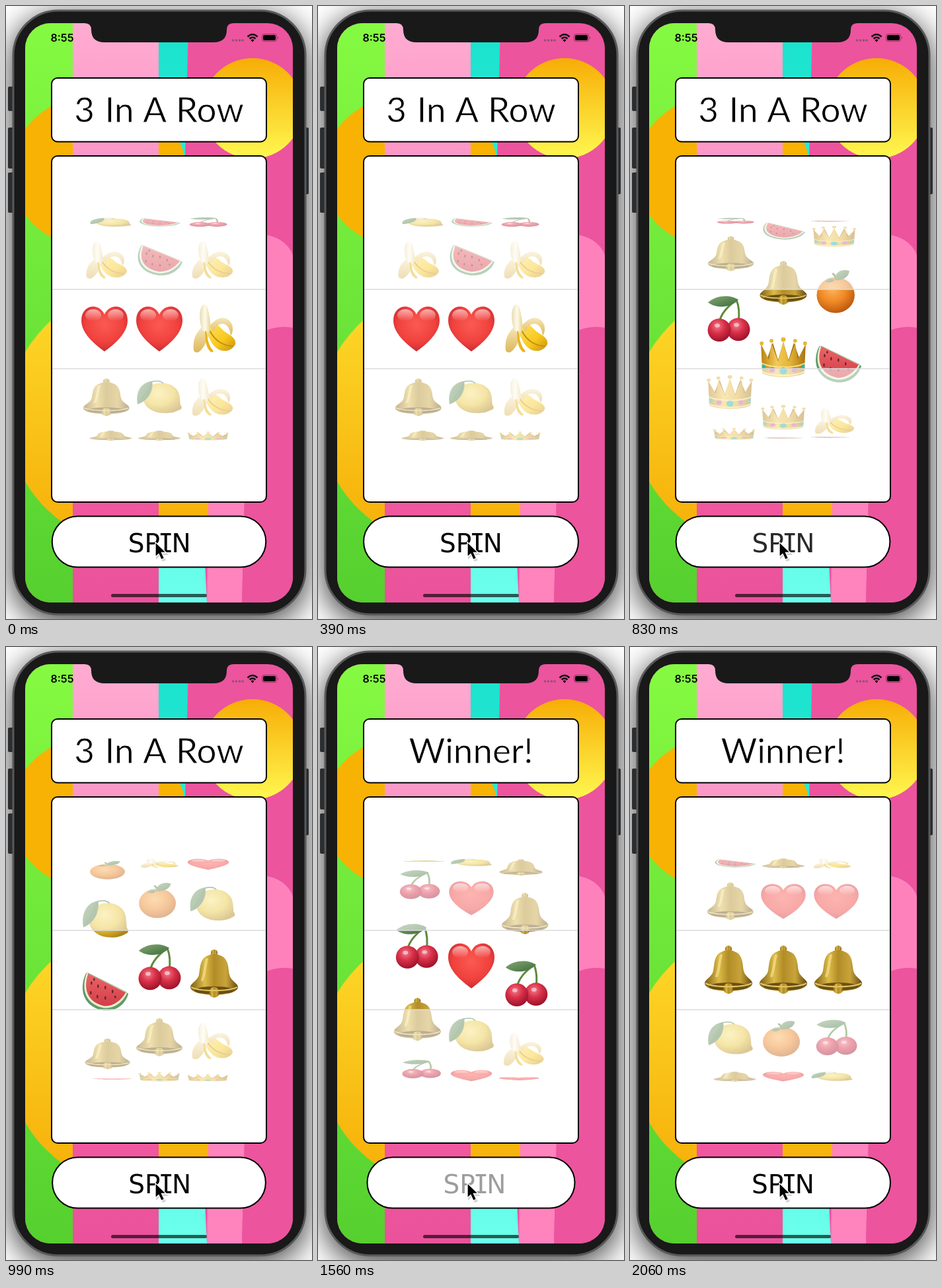
An HTML page that plays this animation: 463 px wide and 928 px high, repeating every 2090 ms.

```html
<!DOCTYPE html>
<html lang="en">
<head>
<meta charset="utf-8">
<title>3 In A Row</title>
<style>
  html, body { margin: 0; width: 100%; height: 100%; overflow: hidden; background: #fff; }
  #stage { position: relative; width: 463px; height: 928px; overflow: hidden; }
  #shadow { position: absolute; left: 11px; top: 7px; width: 442px; height: 914px; border-radius: 68px;
    box-shadow: 0 10px 44px 4px rgba(0, 0, 0, .72); }
  svg { position: absolute; left: 0; top: 0; display: block; }
  .panel { fill: #fff; stroke: #000; stroke-width: 2; }
  .title { font: 400 53px Lato, "Open Sans", sans-serif; text-anchor: middle; word-spacing: 2px; stroke: #fff; stroke-width: .8; }
  .clock { font: 600 16px Inter, Roboto, sans-serif; }
  .spin { font: 39px "DejaVu Sans", sans-serif; }
  .serif-i { font-family: "DejaVu Sans Mono", monospace; }
</style>
</head>
<body>
<div id="stage">
<div id="shadow"></div>
<svg width="463" height="928" viewBox="0 0 463 928">
  <defs>
    <linearGradient id="green" x2="0" y2="1"><stop stop-color="#85fa42"/><stop offset="1" stop-color="#55d02f"/></linearGradient>
    <linearGradient id="pink" x2="0" y2="1"><stop stop-color="#ffabd1"/><stop offset=".22" stop-color="#fb98c7"/><stop offset=".82" stop-color="#f0589f"/><stop offset="1" stop-color="#ea529b"/></linearGradient>
    <linearGradient id="teal" x2="0" y2="1"><stop stop-color="#18e2cd"/><stop offset="1" stop-color="#6cffec"/></linearGradient>
    <linearGradient id="sun" x2="0" y2="1"><stop stop-color="#f7ad06"/><stop offset="1" stop-color="#fff850"/></linearGradient>
    <linearGradient id="amber" x2="0" y2="1"><stop stop-color="#fddb2b"/><stop offset="1" stop-color="#f6ae08"/></linearGradient>
    <radialGradient id="heartFill" cx=".5" cy=".4" r=".62"><stop stop-color="#fb5a52"/><stop offset=".65" stop-color="#f0413d"/><stop offset="1" stop-color="#c32a31"/></radialGradient>
    <linearGradient id="gloss" x2="0" y2="1"><stop stop-color="#fff" stop-opacity=".6"/><stop offset="1" stop-color="#fff" stop-opacity="0"/></linearGradient>
    <linearGradient id="peel" x2="1" y2="1"><stop stop-color="#ffe36a"/><stop offset=".6" stop-color="#f8c91f"/><stop offset="1" stop-color="#c98f10"/></linearGradient>
    <linearGradient id="flesh"><stop stop-color="#e9dcb4"/><stop offset=".5" stop-color="#fffbe9"/><stop offset="1" stop-color="#e6d49c"/></linearGradient>
    <linearGradient id="cream" x2="0" y2="1"><stop stop-color="#f6e6b8"/><stop offset="1" stop-color="#dcb75c"/></linearGradient>
    <linearGradient id="red" x2="0" y2="1"><stop stop-color="#ec6468"/><stop offset="1" stop-color="#d23e49"/></linearGradient>
    <radialGradient id="lemonFill" cx=".4" cy=".35" r=".7"><stop stop-color="#f8e47c"/><stop offset=".55" stop-color="#e9c63a"/><stop offset="1" stop-color="#b08415"/></radialGradient>
    <radialGradient id="orangeFill" cx=".42" cy=".35" r=".68"><stop stop-color="#fbb258"/><stop offset=".5" stop-color="#f08a25"/><stop offset="1" stop-color="#b9560c"/></radialGradient>
    <radialGradient id="cherryFill" cx=".42" cy=".32" r=".7"><stop stop-color="#f27a8a"/><stop offset=".45" stop-color="#d93149"/><stop offset="1" stop-color="#9a1029"/></radialGradient>
    <linearGradient id="leaf" x2="1" y2="1"><stop stop-color="#86a872"/><stop offset="1" stop-color="#3b6b3c"/></linearGradient>
    <linearGradient id="gold"><stop stop-color="#7d5e14"/><stop offset=".3" stop-color="#dcbb4a"/><stop offset=".5" stop-color="#b28c26"/><stop offset=".75" stop-color="#c8a43a"/><stop offset="1" stop-color="#654a10"/></linearGradient>
    <linearGradient id="crownFill"><stop stop-color="#b98314"/><stop offset=".35" stop-color="#f3ca55"/><stop offset=".65" stop-color="#e4b436"/><stop offset="1" stop-color="#a87410"/></linearGradient>
    <clipPath id="screen"><rect x="29" y="26" width="405" height="877" rx="38"/></clipPath>

    <g id="H">
      <path d="M0 34C-12 25-35 8-35-13C-35-27-26-34-17-34C-9-34-3-29 0-22C3-29 9-34 17-34C26-34 35-27 35-13C35 8 12 25 0 34Z" fill="url(#heartFill)"/>
      <ellipse cx="-17" cy="-21" rx="12" ry="9" fill="url(#gloss)"/><ellipse cx="17" cy="-21" rx="12" ry="9" fill="url(#gloss)"/>
    </g>
    <g id="B">
      <path d="M-13 0C-8 14-1 32 14 33C23 34 29 29 32 23C33 17 29 12 22 8C12 3 7-8-2-10Z" fill="url(#peel)"/>
      <path d="M-7 2C0 16 10 25 28 26" fill="none" stroke="#c4930f" stroke-width="2"/>
      <path d="M-6-4C2-19 20-22 27-7C29 0 28 7 25 10C24 0 20-8 12-8C6-8 2-3-1 4Z" fill="url(#cream)"/>
      <path d="M-18-3C-27 4-33 17-31 32C-30 36-24 37-20 32C-14 25-8 14-8 1Z" fill="url(#cream)"/>
      <path d="M-19 0C-23-14-23-30-18-36C-15-39-11-37-10-32C-7-20-5-8-6 2C-8 8-16 6-19 0Z" fill="url(#flesh)"/>
      <path d="M-12 3C-10 12-10 23-2 32C0 35-3 36-6 34C-14 26-13 14-14 3Z" fill="#e9b41d"/>
    </g>
    <g id="M">
      <path d="M-28-29C-38-10-37 22-2 29C18 31 32 18 36 3L31-1L-25-29Z" fill="#5f9a68"/>
      <path d="M-27-29C-35-10-33 19-1 25C16 26 29 14 34 2L30-1Z" fill="#e9efce"/>
      <path d="M-25-28C-32-8-29 16 0 22C15 22 26 12 32 1Z" fill="url(#red)"/>
      <path d="M-20-15v3M-10-10v3M1-8v3M-21 0v3M-11 6v3M1 8v3M12-2v3M16 7v2M-16-20v2" stroke="#5b2427" stroke-width="2.200" stroke-linecap="round"/>
    </g>
    <g id="L">
      <path d="M-20-18C-8-32 17-33 28-15C33-6 32 6 33 14C36 18 36 23 31 24C21 32-2 33-14 23C-27 13-29-6-20-18Z" fill="url(#lemonFill)"/>
      <path d="M-11-32C-29-30-38-10-34 13C-20 7-9-9-11-32Z" fill="url(#leaf)"/>
      <path d="M-13-28C-16-15-24-2-32 10M-15-30C-8-33 2-34 6-28" fill="none" stroke="#55804a" stroke-width="2"/>
    </g>
    <g id="C" >
      <path d="M12-31C-1-21-11-11-14 3M12-31C16-21 17-11 15 3" fill="none" stroke="#5d8a3c" stroke-width="3"/>
      <path d="M15-31C4-39-18-39-31-27C-18-17 4-19 15-31Z" fill="url(#leaf)"/>
      <circle cx="15" cy="14" r="17.500" fill="url(#cherryFill)"/><circle cx="-14" cy="15" r="17.500" fill="url(#cherryFill)"/>
      <ellipse cx="-17" cy="8" rx="4" ry="3" fill="#fff" opacity=".5"/><ellipse cx="12" cy="7" rx="4" ry="3" fill="#fff" opacity=".5"/>
    </g>
    <g id="N">
      <circle cy="-32" r="5" fill="url(#gold)"/>
      <path d="M-9-28C-4-31 4-31 9-28C22-24 21-9 23 1C25 11 36 14 36 20C36 36-36 36-36 20C-36 14-25 11-23 1C-21-9-22-24-9-28Z" fill="url(#gold)"/>
      <ellipse cy="25" rx="30" ry="6" fill="#6b4f12"/>
      <circle cy="28" r="8" fill="url(#gold)"/>
      <path d="M-35 20C-22 27 22 27 35 20" fill="none" stroke="#e4c764" stroke-width="2"/>
      <path d="M-11-22C-14-12-14 0-18 9" fill="none" stroke="#fbe893" stroke-width="4" stroke-linecap="round" opacity=".6"/>
    </g>
    <g id="K" >
      <path d="M-26 9L-16-20L-8 7L0-21L8 7L16-20L26 9V18H-26Z" fill="#9c6f14"/>
      <path d="M-34-18L-22 6L-18-20L-8 9L0-22L8 9L18-20L22 6L34-18L32 27C18 36-18 36-32 27Z" fill="url(#crownFill)"/>
      <path d="M-33 12C-18 20 18 20 33 12M-32 25C-18 33 18 33 32 25" fill="none" stroke="#fbe48a" stroke-width="2"/>
      <g fill="#e5b73a"><circle cx="-33" cy="-19" r="3"/><circle cx="-18" cy="-23" r="3"/><circle cy="-25" r="3.500"/><circle cx="18" cy="-23" r="3"/><circle cx="33" cy="-19" r="3"/></g>
      <g fill="#c55bc0"><circle cx="-17" cy="22" r="4"/><circle cx="17" cy="22" r="4"/></g>
      <g fill="#27b5b0"><circle cy="24" r="5.500"/><ellipse cx="-30" cy="18" rx="2.500" ry="4"/><ellipse cx="30" cy="18" rx="2.500" ry="4"/></g>
    </g>
    <g id="O">
      <circle cx="-3" cy="6" r="29" fill="url(#orangeFill)"/>
      <path d="M-3-19C-3-24-5-27-8-29" fill="none" stroke="#5b7a38" stroke-width="3"/>
      <path d="M-5-18C-4-33 8-37 18-33C17-23 8-17-5-18Z" fill="url(#leaf)"/>
      <path d="M-5-18C-11-23-16-21-19-16C-14-13-9-14-5-18Z" fill="url(#leaf)"/>
    </g>
  </defs>

  <g fill="#2b2d2f">
    <rect x="3" y="122" width="12" height="37" rx="2"/><rect x="3" y="184" width="12" height="62" rx="2"/>
    <rect x="3" y="252" width="12" height="61" rx="2"/><rect x="446" y="184" width="12" height="101" rx="2"/>
  </g>
  <rect x="11" y="7" width="442" height="914" rx="68" fill="#191919" stroke="#58595b" stroke-width="3"/>

  <g clip-path="url(#screen)">
    <rect x="29" y="26" width="405" height="877" fill="#ec549e"/>
    <rect x="29" y="26" width="75" height="877" fill="url(#green)"/>
    <path d="M231 26H276L271 230L304 903H231Z" fill="url(#teal)"/>
    <ellipse cx="140" cy="251" rx="133" ry="118" fill="#f8b203"/>
    <circle cx="199" cy="622" r="196" fill="url(#amber)"/>
    <rect x="101" y="26" width="130" height="877" fill="url(#pink)"/>
    <path d="M308 600H365L357 903H304Z" fill="#ff83bd"/>
    <path d="M361 740H434V903H357ZM306 240H434V740H306Z" fill="#ec549e"/>
    <path d="M390 346Q424 351 434 377V487Q410 483 390 493Z" fill="#ff81bc"/>
    <circle cx="373" cy="155" r="76" fill="url(#sun)"/>
    <path d="M119 20V26Q129 26 129 36Q129 55 149 55H314Q334 55 334 36Q334 26 344 26V20Z" fill="#191919"/>
  </g>

  <text class="clock" x="67.500" y="54">8:55</text>
  <g fill="#8d5374"><circle cx="343.500" cy="52" r="1.800"/><circle cx="348.500" cy="52" r="1.800"/><circle cx="353.500" cy="52" r="1.800"/><circle cx="358" cy="52" r="1.800"/></g>
  <g fill="none" stroke="#111" stroke-width="2.600"><path d="M365.500 46.500Q373 39.500 380.500 46.500M368.500 49.500Q373 45.500 377.500 49.500"/></g>
  <path d="M370.500 51.500Q373 49.500 375.500 51.500L373 54.500Z"/>
  <rect x="387.500" y="42.500" width="22" height="11" rx="3" fill="none" stroke="#111" stroke-opacity=".45"/>
  <rect x="389" y="44" width="19" height="8" rx="2"/><path d="M411 46.500q2 1.500 0 3z" opacity=".5"/>

  <rect class="panel" x="69" y="109" width="325" height="96.500" rx="9"/>
  <text id="title" class="title" x="231.500" y="176">3 In A Row</text>

  <rect class="panel" x="69" y="227" width="325" height="524" rx="9"/>
  <g id="reels"></g>
  <path d="M100 300H364V429H100ZM100 549H364V680H100Z" fill="#fff" opacity=".55"/>
  <path d="M70 429H393M70 549H393" stroke="#dcdcdc" stroke-width="1.500"/>

  <rect id="button" class="panel" x="69" y="772.500" width="325" height="77" rx="38.500"/>
  <text id="label" class="spin" x="184" y="826.500">SP<tspan class="serif-i" dx="-3">I</tspan><tspan dx="-3">N</tspan></text>
  <circle id="tap" cx="224" cy="813" r="32" fill="none" stroke="#000" stroke-width="3"/>
  <rect x="159" y="890" width="145" height="5" rx="2.500" opacity=".64"/>
  <path d="M227 815v23l5-5l5 8l5-2l-4-8h8z" opacity=".18"/>
  <path d="M226 811.500V834l5-4.500l4 8.500l4.500-2l-4-8.500h7z" stroke="#fff" stroke-width="1.300"/>
</svg>
</div>
<script>
const LOOP = 2090, STEPS = 63, STEP = LOOP / STEPS;
const SPINS = [630, 1480];          // moments the button is released
const WIN_AT = 1450;
const PITCH = 39 * Math.PI / 180, RADIUS = 165, FIRST_ROW = -2;

const TIMES = [0, 610, 830, 1210, 1440, 1560, 1790, 2050, LOOP];
const REELS = [
  { strip: "LBHNN OCM CNCKK BHOLMNH CMBKC NCCNC OKHBL LMOON KHC MNNLN", mid: [8.14, 25.34, 35.16] },
  { strip: "MMHLN COBH MNKKM LBOCNK HLHHL LHHLH NCKBO LMMMHO CB NHNOH", mid: [8.66, 25.09, 35.48] },
  { strip: "CBBBK NLHM KOMBM CHLNBK NCBHC NNCBH OLKMC NLCHM BOK BHNCL", mid: [8.54, 24.83, 34.87] }
];
const $ = id => document.getElementById(id);
const [title, button, label, tap, reelLayer] = ["title", "button", "label", "tap", "reels"].map($);

for (const reel of REELS) {
  const [a, b, c] = reel.mid;
  reel.strip = reel.strip.replace(/ /g, "");
  reel.path = [0, 0, a, 20, 20, b, c, 43, 43];
  reel.slots = Array.from({ length: 6 }, () =>
    reelLayer.appendChild(document.createElementNS("http://www.w3.org/2000/svg", "use")));
}

// Monotone cubic through the points of a reel's path.
function along(path, t) {
  let i = 0;
  while (i < TIMES.length - 2 && t >= TIMES[i + 1]) i++;
  const slope = k => k < 0 || k > path.length - 2 ? 0 : (path[k + 1] - path[k]) / (TIMES[k + 1] - TIMES[k]);
  const tangent = k => {
    const m = slope(k - 1), n = slope(k);
    return m * n > 0 ? 2 * m * n / (m + n) : 0;
  };
  const h = TIMES[i + 1] - TIMES[i], u = (t - TIMES[i]) / h, v = 1 - u;
  return path[i] * (1 + 2 * u) * v * v + path[i + 1] * u * u * (3 - 2 * u)
    + h * u * v * (tangent(i) * v - tangent(i + 1) * u);
}

function drawReel(reel, col, t) {
  const pos = along(reel.path, t), first = Math.floor(pos) - 2;
  reel.slots.forEach((slot, k) => {
    const row = first + k, angle = (row - pos) * PITCH, symbol = reel.strip[row - FIRST_ROW];
    const shown = symbol && Math.abs(angle) < 1.72;
    slot.style.display = shown ? "" : "none";
    if (!shown) return;
    const c = Math.cos(angle), s = 1 / (1 + .16 * (1 - c));
    const x = 232 + (col - 1) * 83 * s, y = 489 + RADIUS * Math.sin(angle);
    slot.setAttribute("href", "#" + symbol);
    slot.setAttribute("transform", `translate(${x} ${y}) scale(${s} ${Math.max(c, .025)})`);
  });
}

// Change of the button's width while it springs back after a release.
function bounce(age) {
  return age < 42 ? 0 : -15.1 * Math.exp(-age / 250) * Math.sin(2 * Math.PI * (age - 42) / 153);
}

function fade(age) {
  if (age < -70) return 0;
  return age < 80 ? .62 : .62 * Math.exp((80 - age) / 90);
}

function draw(t) {
  REELS.forEach((reel, col) => drawReel(reel, col, t));
  const age = t - (t < 1300 ? SPINS[0] : SPINS[1]);
  const grow = t < 400 ? -1.5 * Math.exp(-t / 150) : bounce(age);
  button.setAttribute("x", 69 - grow / 2);
  button.setAttribute("width", 325 + grow);
  label.setAttribute("x", 184 - grow / 2);
  label.setAttribute("opacity", 1 - fade(age));
  const tapped = SPINS.some(s => t > s - 210 && t < s - 80);
  tap.style.display = tapped ? "" : "none";
  title.textContent = t < WIN_AT ? "3 In A Row" : "Winner!";
}

const start = performance.now();
function tick() {
  const t = (performance.now() - start) % LOOP;
  draw(Math.min(STEPS - 1, Math.floor(t / STEP + .3)) * STEP);
  requestAnimationFrame(tick);
}
tick();
</script>
</body>
</html>
```
